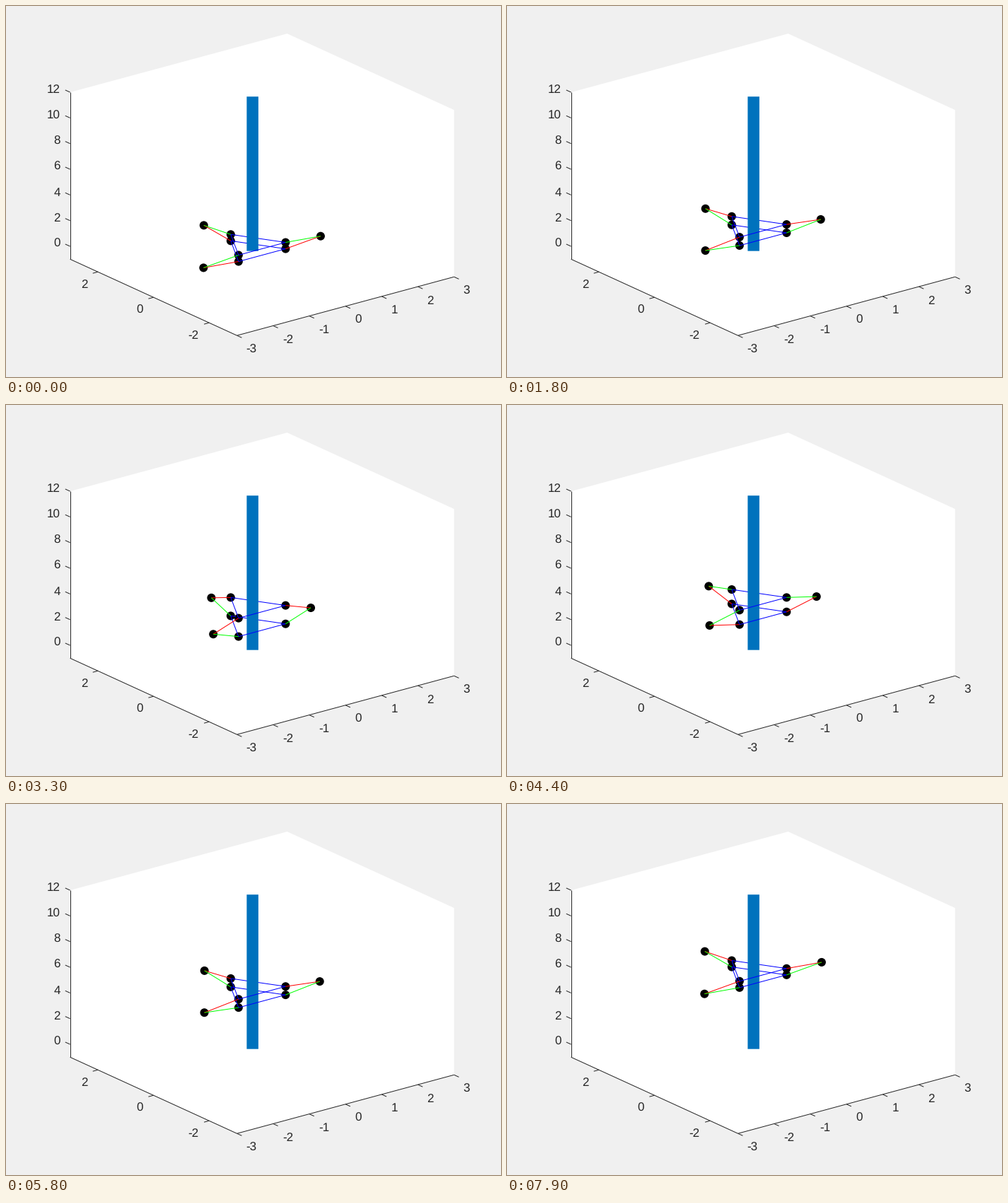
These frames come from a looping animation (700 px wide and 525 px high, 8000 ms). A matplotlib script:

```python
import numpy as np
import matplotlib.pyplot as plt
from matplotlib.animation import FuncAnimation
from matplotlib.patches import Circle, Polygon, Rectangle

W, H, DPI = 700, 525, 100
PX = 72 / DPI                      # one pixel in points
INK = "#262626"

# orthographic projection: screen vectors of the three axes
EX = np.array([51.17, -13.83])
EY = np.array([-39.33, -18.0])
EZ = np.array([0.0, -18.17])
ORIGIN = np.array([362.1, 352.6])

# climbing robot
SIDE, LEG = 1.3, 1.0
GAP, STEP, PHASE = 0.5, 1.4, 10    # closed gap, stride, frames per half stride
FEET = [(0, SIDE * np.sqrt(3) / 2), (-SIDE / 2, 0), (SIDE / 2, 0)]
OUTWARD = [(0, 1), (-1, 0), (1, 0)]


def project(x, y, z):
    return ORIGIN + x * EX + y * EY + z * EZ


plt.rcParams["font.family"] = "Liberation Sans"
plt.rcParams["text.hinting"] = "none"
fig = plt.figure(figsize=(W / DPI, H / DPI), dpi=DPI, facecolor="#f0f0f0")
ax = fig.add_axes([0, 0, 1, 1])
ax.set_xlim(0, W)
ax.set_ylim(H, 0)
ax.axis("off")


def line(color, z, pts=((), ())):
    return ax.plot(*pts, color=color, lw=PX, zorder=z, solid_capstyle="butt")[0]


def segment(p, q):
    line(INK, 2, ([p[0], q[0]], [p[1], q[1]]))


def label(x, y, value, ha):
    ax.text(x, y + 6, str(value), fontsize=17 * PX, color=INK, ha=ha,
            va="baseline", zorder=2)


def draw_box():
    corner, left, right = project(-3, -3, -1), project(-3, 3, -1), project(3, -3, -1)
    up = 13 * EZ
    outline = [corner, right, right + up, project(3, 3, 12), left + up, left]
    ax.add_patch(Polygon(outline, fc="white", ec="none", zorder=0))
    for a, b in ((corner, right), (corner, left), (left, left + up)):
        segment(a, b)
    for v in range(-3, 4):
        p = project(v, -3, -1)
        segment(p, p + (6.8, 3.1))
        label(p[0] + 13, p[1] + 18.5, v, "left")
    for v in (-2, 0, 2):
        p = project(-3, v, -1)
        segment(p, p + (-7.2, 1.95))
        label(p[0] - 14.5, p[1] + 16.5, v, "right")
    for v in range(0, 13, 2):
        p = project(-3, 3, v)
        segment(p, p + (-6.8, -3.1))
        label(77, p[1] - 4.8, v, "right")


draw_box()
ax.add_patch(Rectangle((340.4, 128.2), 16.5, 218.5, fc="#0072bd", ec="none",
                       snap=False, zorder=4))

dots = [ax.add_patch(Circle((0, 0), 6, fc="black", ec="none", zorder=5))
        for _ in range(9)]
# the edge between feet 0 and 2 runs behind the pole
edges = [(level, a, b, line("blue", 3 if (a, b) == (0, 2) else 6))
         for level in (0, 1) for a, b in ((0, 1), (1, 2), (0, 2))]
edge_caps = [line("blue", 6) for _ in range(4)]
legs = [(line("red", 7), line("lime", 7)) for _ in FEET]


def levels(i):
    """Heights of the lower and upper platform, and which one is moving."""
    stride, k = divmod(i, 2 * PHASE)
    lower = stride * STEP
    upper = lower + GAP
    shift = STEP * (k % PHASE) / (PHASE - 1)
    if k < PHASE:
        return (lower, upper + shift), 1
    return (lower + shift, upper + STEP), 0


def join(artist, p, q):
    artist.set_data([p[0], q[0]], [p[1], q[1]])


def draw(i):
    heights, moving = levels(i)
    half = (heights[1] - heights[0]) / 2
    reach = np.sqrt(LEG ** 2 - half ** 2)
    feet = [[project(x, y, z) for x, y in FEET] for z in heights]
    mid = heights[0] + half
    knees = [project(x + reach * u, y + reach * v, mid)
             for (x, y), (u, v) in zip(FEET, OUTWARD)]

    for dot, p in zip(dots, feet[0] + feet[1] + knees):
        dot.center = p
    for level, a, b, artist in edges:
        join(artist, feet[level][a], feet[level][b])
    # keep the ends of the rear edges visible on top of the dots
    for level in (0, 1):
        p, q = feet[level][0], feet[level][2]
        d = (q - p) / np.hypot(*(q - p)) * 7
        join(edge_caps[2 * level], p, p + d)
        join(edge_caps[2 * level + 1], q, q - d)
    for n, (fixed, swing) in enumerate(legs):
        join(fixed, knees[n], feet[1 - moving][n])
        join(swing, knees[n], feet[moving][n])
    return dots


anim = FuncAnimation(fig, draw, frames=8 * PHASE, interval=100, repeat=True,
                     repeat_delay=0, blit=False)
plt.show()
```
